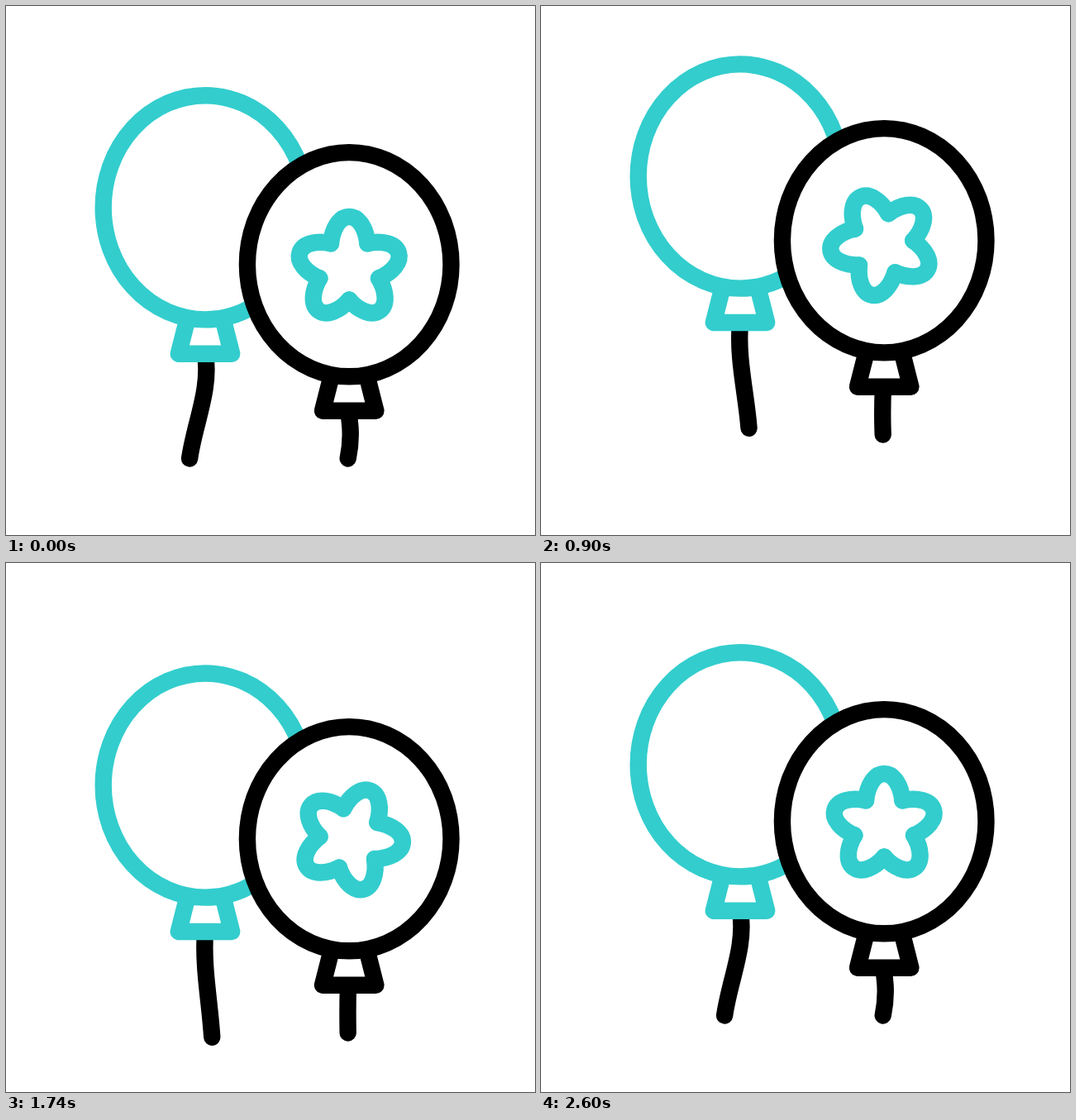
Write an HTML page that moves like this. It is 640x640 px and loops after 2.82 s.

```html
<!DOCTYPE html>
<html lang="en">
<head>
<meta charset="utf-8">
<title>Balloons</title>
<style>
  html, body { margin: 0; height: 100%; overflow: hidden; background: #fff; }
  svg { display: block; width: 100vw; height: 100vh; }
  path, ellipse { fill: none; stroke-width: 20.4; stroke-linecap: round; stroke-linejoin: round; }
  .black { stroke: #000; }
  .teal { stroke: #33cdcd; }
</style>
</head>
<body>
<svg viewBox="0 0 640 640">
  <defs>
    <g id="balloon">
      <ellipse rx="123.3" ry="135.6" style="fill:#fff"/>
      <path d="M-21.8 136L-32.2 177H32.2L21.8 136"/>
    </g>
    <path id="arm" class="teal" d="M-22.2 -30.4C-20.5 -48 -12 -62.8 0 -62.8S20.5 -48 22.2 -30.4"/>
  </defs>
  <g id="left">
    <path id="leftString" class="black"/>
    <use href="#balloon" class="teal" x="241" y="243.8"/>
  </g>
  <g id="right">
    <path id="rightString" class="black"/>
    <use href="#balloon" class="black" x="415.2" y="312.7"/>
    <g id="star"></g>
  </g>
</svg>
<script>
const LOOP = 2820, SPAN = 2200, LEFT_START = 200, RIGHT_START = 400;
const $ = id => document.getElementById(id);
const clamp = x => Math.min(1, Math.max(0, x));
const ease = x => x * x * (3 - 2 * x);
const mix = (a, b, k) => a + (b - a) * k;
const move = (id, transform) => $(id).setAttribute("transform", transform);

// A hanging string: its upper bend, lower bend and tip are sideways offsets.
function hang(id, x, y, length, upper, lower, tip) {
  $(id).setAttribute("d",
    `M${x} ${y}c${upper} ${length / 3} ${lower} ${length * 2 / 3} ${tip} ${length}`);
}

// Rise, sink below rest, and return, in three equal eased legs.
function bob(p) {
  const stops = [0, -38, 26, 0];
  const leg = Math.min(2, Math.floor(p * 3));
  return mix(stops[leg], stops[leg + 1], ease(p * 3 - leg));
}

function draw() {
  const t = performance.now() % LOOP;
  const p = clamp((t - LEFT_START) / SPAN);
  const q = clamp((t - RIGHT_START) / SPAN);
  const swing = ease(1 - Math.abs(2 * p - 1));
  const lean = mix(-0.9, 1.1, swing);
  const bow = mix(3.7, -3, swing);

  move("left", `translate(0 ${bob(p)})`);
  move("right", `translate(0 ${bob(q)})`);
  move("star", `translate(414.8 314.7) rotate(${360 * ease(q)}) translate(.4 3.1)`);
  hang("leftString", 241, 421.5, mix(126, 127.5, swing), -7.8 * lean, 14.5 * lean, 21 * lean);
  hang("rightString", 414, 490.5, 57, bow, bow, -0.3);
  requestAnimationFrame(draw);
}

for (let angle = 0; angle < 360; angle += 72)
  $("star").innerHTML += `<use href="#arm" transform="rotate(${angle})"/>`;
draw();
</script>
</body>
</html>
```
